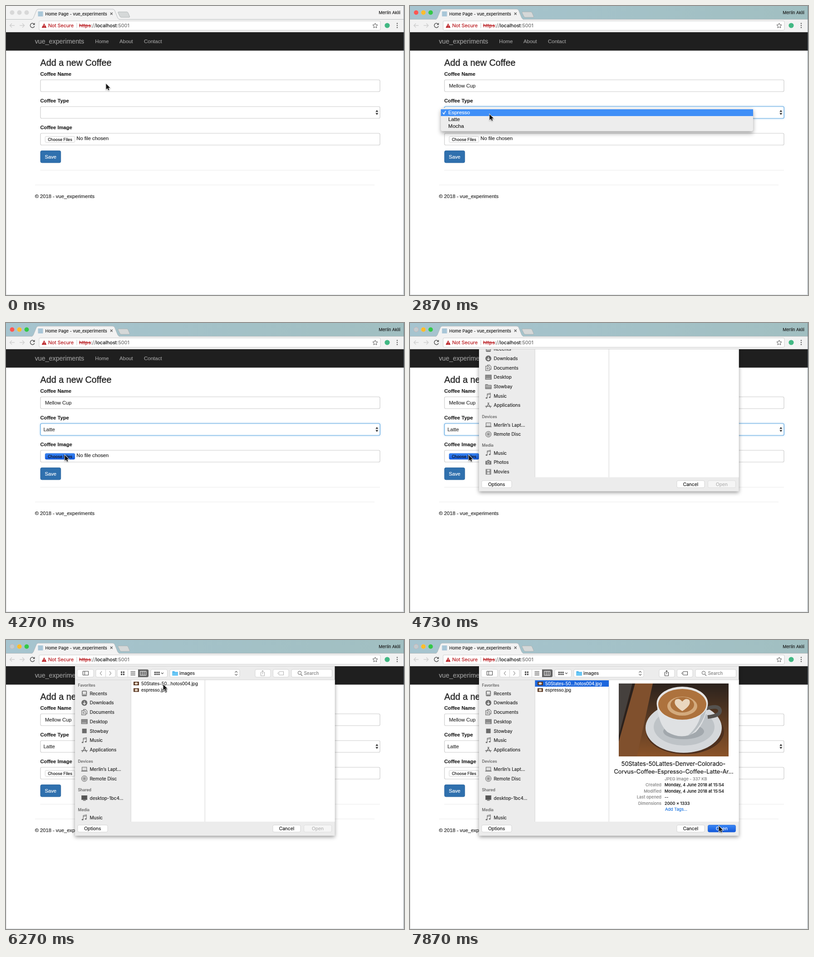
Write an HTML page that moves like this. It is 877 px wide and 638 px high and loops after 8 s.

```html
<!DOCTYPE html>
<html lang="en">
<head>
<meta charset="utf-8">
<title>Coffee form</title>
<style>
html, body { margin: 0; width: 100%; height: 100%; overflow: hidden; background: #fff; }
svg { display: block; }
#stage { width: 100vw; height: 100vh; font-family: "Liberation Sans", Arial, sans-serif; }
text, tspan { white-space: pre; fill: currentColor; stroke: currentColor; stroke-width: .2; }
.ui { font-family: Inter, Roboto, sans-serif; }
.line { fill: none; stroke-width: 1.1; }
.glow { filter: drop-shadow(0 0 2px rgba(102,175,233,.55)); }
.pop { filter: drop-shadow(0 5px 5px rgba(0,0,0,.35)); }
.shade { filter: drop-shadow(0 3px 4px rgba(0,0,0,.4)); }
.ptr { filter: drop-shadow(0 1px 1px rgba(0,0,0,.35)); }
</style>
</head>
<body>
<svg id="stage" viewBox="0 0 877 638" preserveAspectRatio="none"></svg>
<script>
const LOOP = 8000, FRAME = 200 / 3;

const rect = (x, y, w, h, fill, more = '') =>
  `<rect x="${x}" y="${y}" width="${w}" height="${h}" fill="${fill}" ${more}/>`;
const text = (x, y, size, str, color = '#262626', more = '') =>
  `<text x="${x}" y="${y}" font-size="${size}" color="${color}" ${more}>${str}</text>`;
const path = (d, fill, more = '') => `<path d="${d}" fill="${fill}" ${more}/>`;
const line = (d, stroke, more = '') => `<path class="line" d="${d}" stroke="${stroke}" ${more}/>`;
const circle = (x, y, r, fill, more = '') =>
  `<circle cx="${x}" cy="${y}" r="${r}" fill="${fill}" ${more}/>`;
const ellipse = (x, y, rx, ry, fill, more = '') =>
  `<ellipse cx="${x}" cy="${y}" rx="${rx}" ry="${ry}" fill="${fill}" ${more}/>`;
const group = (id, body, more = '') => `<g id="${id}" ${more}>${body}</g>`;
const at = (x, y, body) => `<g transform="translate(${x} ${y})">${body}</g>`;
const mid = 'text-anchor="middle"', end = 'text-anchor="end"', bold = 'font-weight="bold"', medium = 'font-weight="500"';

const gradient = (id, top, bottom) =>
  `<linearGradient id="${id}" x2="0" y2="1"><stop stop-color="${top}"/><stop offset="1" stop-color="${bottom}"/></linearGradient>`;

const defs = `<defs>
  ${gradient('blue', '#65aefa', '#1a70f5')}
  ${gradient('press', '#3a87f5', '#1257da')}
  ${gradient('wood', '#2b221d', '#8a5329')}
  <linearGradient id="strip"><stop stop-color="#a6c4cf"/><stop offset="1" stop-color="#a1bfc1"/></linearGradient>
  <clipPath id="page"><rect y="58" width="877" height="580"/></clipPath>
  <clipPath id="side"><rect x="152" y="58" width="123" height="343"/></clipPath>
</defs>`;

// Browser window
const lights = (id, colors) => group(id, colors.map((c, i) => circle(13.5 + 16 * i, 14.5, 5, c)).join(''));

function browser() {
  const dots = [38.5, 43, 47.5].map(y => circle(862, y, 1.2, '#5a5a5a')).join('');
  return rect(0, 0, 877, 30, '#f3f3f3') + rect(0, 0, 877, 30, 'url(#strip)', 'id="strip-on"') +
    lights('lights-off', ['#d8d8d8', '#d8d8d8', '#d8d8d8']) +
    lights('lights-on', ['#fc5753', '#fdbc2e', '#33c748']) +
    circle(13.5, 14.5, 5, '#c3cccf', 'id="close-off"') +
    rect(0, 29, 877, 29, '#f2f2f2') + line('M0 29.5H877', '#b9bdbe', 'stroke-width=".8"') +
    path('M56 30Q59 29 60.5 26L67 10Q68.5 7 71 7H235Q238 7 239.5 10L246 26Q247.5 29 251 30', '#f2f2f2', 'stroke="#aeb3b5" stroke-width=".8"') +
    path('M248 13H266Q268 13 269 15L272.5 23Q273 25 271 25H254Q252 25 251 23L247 15Q246.5 13 248 13Z', '#d5d8d8', 'stroke="#a5abac" stroke-width=".8"') +
    rect(70.5, 12, 11, 11, '#a9c6d8') +
    text(86.5, 20.6, 9.4, 'Home Page - vue_experiments', '#1c1c1c', 'class="ui"') +
    line('M229.8 14.5l5 5m0-5l-5 5', '#555') +
    text(869, 18.4, 9.2, 'Merlin Akili', '#1c1c1c', `class="ui" ${end}`) +
    line('M19 43H8.5m4.5-4.5L8.5 43l4.5 4.5M30 43H40.5m-4.5-4.5l4.5 4.5-4.5 4.5', '#cfcfcf', 'style="stroke-width:1.4"') +
    line('M62.3 40.3A4.8 4.8 0 1 0 62.8 44.5', '#555', 'style="stroke-width:1.5"') +
    path('M63.5 37v4.7h-4.7z', '#555') +
    rect(73, 33, 752, 20.5, '#fff', 'rx="2.5" stroke="#c9c9c9" stroke-width=".9"') +
    path('M84 38.2L89.3 48H78.7Z', '#b8171c') + rect(83.5, 41.5, 1.1, 3.4, '#fff') + rect(83.5, 45.7, 1.1, 1.1, '#fff') +
    text(93, 47, 10.6, 'Not Secure', '#b8171c', 'class="ui"') +
    line('M156 37V49', '#d0d0d0') +
    text(161, 47, 10.85, '<tspan color="#b8171c" text-decoration="line-through">https</tspan>://<tspan color="#111">localhost</tspan>:5001', '#707070', 'class="ui"') +
    path('M813.5 37.8l1.6 3.6 3.9.4-2.9 2.6.8 3.9-3.4-2-3.4 2 .8-3.9-2.9-2.6 3.9-.4z', 'none', 'stroke="#555"') +
    circle(840, 43, 5.6, '#41b883') + dots + rect(0, 57, 877, 1, '#cfcfcf');
}

// Page content
const field = y => rect(76, y, 748, 26, '#fff', 'rx="2.8" stroke="#ccc" stroke-width="1.2"');
const glow = (id, y) => rect(76, y, 748, 26, '#fff', `id="${id}" class="glow" rx="2.8" stroke="#66afe9" stroke-width="1.2"`);
const label = (y, str) => text(75.5, y, 11.2, str, '#222', bold);

function page() {
  return rect(0, 58, 877, 580, '#fff') + rect(0, 58, 877, 40.5, '#1f1f1f') +
    text(63.7, 83, 14.25, 'vue_experiments', '#9d9d9d') +
    text(196.3, 82, 11.3, 'Home', '#9d9d9d') + text(250, 82, 11.4, 'About', '#9d9d9d') + text(304, 82, 11.5, 'Contact', '#9d9d9d') +
    text(75.5, 131.5, 19.8, 'Add a new Coffee', '#262626', 'style="stroke-width:.4"') +
    label(154.3, 'Coffee Name') + field(163) + glow('name-focus', 163) +
    text(86, 180, 11.2, '', '#333', 'id="name"') +
    label(213.3, 'Coffee Type') + field(222) + glow('type-focus', 222) +
    text(82.5, 239, 11.4, 'Latte', '#333', 'id="type"') +
    path('M814.3 233.8L817.3 229.5L820.3 233.8ZM814.3 236.2L817.3 240.5L820.3 236.2Z', '#333') +
    label(272.3, 'Coffee Image') + field(281) +
    rect(86.3, 288, 65.4, 13, '#fff', 'id="choose" rx="2.5" stroke="#c6c6c6" stroke-width=".8"') +
    text(119, 297.7, 8.8, 'Choose Files', '#111', `class="ui" ${mid}`) +
    text(155.3, 296.3, 11.2, 'No file chosen') +
    rect(76, 319.5, 44.7, 26.5, '#2f70ae', 'rx="3" stroke="#2a649c" stroke-width=".9"') + text(98.3, 337, 11.2, 'Save', '#fff', mid) +
    rect(75.5, 362, 748.5, 1, '#eaeaea') + rect(64, 394.6, 748, 1, '#eaeaea') +
    text(63.7, 423.5, 11.2, '© 2018 - vue_experiments') +
    rect(0, 58, 1, 580, '#000', 'opacity=".14"') + rect(876, 0, 1, 638, '#62707c', 'opacity=".7"') + rect(0, 637, 877, 1, '#d5d9dc');
}

function menu() {
  const items = ['Espresso', 'Latte', 'Mocha'].map((s, i) => text(84.3, 239 + 15 * i, 11.5, s, '#222', `id="item${i}"`));
  return group('menu', rect(68, 225, 688, 51.3, '#ededed', 'class="pop" rx="4"') +
    rect(68, 228, 688, 15, '#3f8ff7', 'id="pick"') + items.join('') +
    line('M72.3 235.3l2.3 3.2 4-7', '#fff', 'id="tick" style="stroke-width:1.5"'));
}

// File sheet
const gray = '#6b6b6b';
const icons = {
  recents: rect(-5.5, -6, 11, 12, gray, 'rx="2"') + rect(-3.8, -4.5, 7.6, 6, '#e5e5e5') + line('M-5 3H5', '#e5e5e5'),
  down: circle(0, 0, 6.5, gray) + line('M0-3.5V3M-3 .5L0 3.5L3 .5', '#eee', 'style="stroke-width:1.5"'),
  docs: line('M-2-3.5V-6H2.5L6-2.5V3.5H3M-6-3.5H0L3-.5V6H-6ZM-4 0H0M-4 2.5H1', gray),
  desktop: rect(-6.5, -4.8, 13, 9.6, '#8b8b8b', `stroke="${gray}"`) + line('M-5 3H5', '#eee', 'stroke-dasharray="1.5 1"'),
  folder: path('M-6.5-4.5H-1.5L0-3H6.5V5H-6.5Z', '#999', `stroke="${gray}"`) + line('M-6-1H6', '#ddd'),
  box: rect(-5, -5, 10, 10, gray),
  music: line('M-2.5 4V-4.5L4.5-6V2.5M-2.5-2.3L4.5-3.8', gray) + ellipse(-4, 4.5, 2, 1.6, gray) + ellipse(3, 3, 2, 1.6, gray),
  apps: line('M-5 5.5L1.5-6M5 5.5L-1.5-6M-7 2H7', gray, 'style="stroke-width:1.4"'),
  laptop: rect(-5.2, -4.5, 10.4, 7.5, '#ddd', `stroke="${gray}"`) + rect(-7, 3.5, 14, 1.4, gray),
  disc: circle(0, 0, 6.3, '#d2d2d2', `stroke="${gray}"`) + circle(0, 0, 3.2, 'none', 'stroke="#888"') + circle(0, 0, 1.5, gray),
  screen: rect(-6, -5.5, 12, 9, '#555', `stroke="${gray}"`) + rect(-3, 4.5, 6, 1.5, gray),
  camera: path('M-6.5-3H-3L-2-5H2L3-3H6.5V5H-6.5Z', '#777') + circle(0, .8, 2.7, '#777', 'stroke="#eee"'),
  film: rect(-6, -6, 12, 12, gray) + rect(-3, -5, 6, 4.4, '#ddd') + rect(-3, .6, 6, 4.4, '#ddd') + line('M-4.7-5V6M4.7-5V6', '#ddd', 'stroke-dasharray="1.5 1.2"'),
};
const icon = (y, name) => at(172.7, y, icons[name]);
const entry = (y, name, str) => icon(y, name) + text(184.5, y + 3.7, 10.1, str);
const heading = (y, str) => text(158.5, y + 3.2, 8.7, str, '#6c6c6c', medium);
const button = (x, y, w, h, more = '') => rect(x, y, w, h, '#fff', `rx="3" stroke="#cdcdcd" stroke-width=".8" ${more}`);

function sidebar() {
  const rows = [['recents', 'Recents'], ['down', 'Downloads'], ['docs', 'Documents'], ['desktop', 'Desktop'],
    ['box', 'Stowbay'], ['music', 'Music'], ['apps', 'Applications']];
  const favorites = rows.map(([name, s], i) => {
    const y = 118 + 20.7 * i;
    if (name !== 'box') return entry(y, name, s);
    return group('box-old', icon(y, 'folder')) + group('box-new', icon(y, 'box')) + text(184.5, y + 3.7, 10.1, s);
  });
  return `<g clip-path="url(#side)">` + heading(100, 'Favorites') + favorites.join('') +
    heading(267.5, 'Devices') + entry(285.3, 'laptop', 'Merlin’s Lapt...') + entry(306, 'disc', 'Remote Disc') +
    group('shared', heading(331, 'Shared') + entry(349, 'screen', 'desktop-1bc4...')) +
    group('media', heading(330, 'Media') + entry(347.5, 'music', 'Music') + entry(368, 'camera', 'Photos') + entry(389, 'film', 'Movies')) + '</g>';
}

function squares(x, y, cols, step, size) {
  let out = '';
  for (let i = 0; i < cols * 2; i++) out += rect(x + i % cols * step, y + (i / cols | 0) * step, size, size, '#444');
  return out;
}

function toolbar() {
  return button(157, 65, 36, 17) + line('M169.5 69H181.5V77.5H169.5ZM173.5 69V77.5', '#444') +
    button(198, 65, 43, 17) + line('M219.5 65V82', '#d5d5d5') + line('M211 69l-3.5 4.5 3.5 4.5M228 69l3.5 4.5-3.5 4.5', '#888') +
    button(245, 65, 69, 17) + line('M268.5 65V82', '#d5d5d5') + squares(253, 69.5, 2, 4.8, 3.2) +
    line('M274.5 69.5H285M274.5 72.2H285M274.5 75H285M274.5 77.7H285', '#444') +
    path('M291 65H311Q314 65 314 68V79Q314 82 311 82H291Z', '#646464') + line('M296 69H308.5V78H296ZM300.2 69V78M304.3 69V78', '#fff') +
    button(319, 65, 36.5, 17) + squares(327, 70, 3, 4.3, 3) + line('M342 72l2.5 2.7 2.5-2.7', '#444') +
    button(361, 65, 154, 17) + path('M366.5 69H371L372.5 70.5H379V78.5H366.5Z', '#49b4ee') + rect(366.5, 71.8, 12.5, 6.7, '#69c7f5') +
    text(382, 77, 10, 'images') + line('M504.5 72l2.7-3 2.7 3M504.5 75l2.7 3 2.7-3', '#444') +
    button(549, 65, 34, 17) + button(588.5, 65, 34.5, 17) +
    group('tools', line('M563.5 71.5H561.5V79H569.5V71.5H567.5M565.5 75.5V67.5M563.3 69.7l2.2-2.2 2.2 2.2M602.5 69.7H611.5V77.3H602.5L599 73.5Z', 'currentColor') + circle(602.5, 73.5, .8, 'currentColor')) +
    button(629, 65, 89.5, 17) + line('M650 76l3 3', '#555') + circle(647, 72.5, 3.7, 'none', 'stroke="#555"') + text(656.5, 77, 9.9, 'Search', '#858585');
}

const photo = () => `<svg x="460" y="96" width="242" height="161" viewBox="0 0 242 161">` +
  rect(0, 0, 242, 161, 'url(#wood)') +
  path('M30 0H75L40 161H0V110Z', '#80502d') + path('M0 0H30L0 115Z', '#45403d') + path('M30 0L0 115V128L36 0Z', '#2a211d') +
  ellipse(146, 106, 86, 50, '#4e301e') +
  ellipse(143, 98, 84, 55, '#d5d8db') + ellipse(144, 96, 67, 41, '#bec3c7') + ellipse(143, 106, 45, 17, '#a2a8ad') +
  path('M190 56Q220 46 223 59Q225 71 196 74', 'none', 'stroke="#55524f" stroke-width="8"') +
  path('M84 45Q87 89 107 107Q139 126 170 107Q192 83 196 45Z', '#dfe1e3') + path('M160 112Q188 89 196 45L183 60Q178 94 151 116Z', '#b9bfc3') +
  ellipse(140, 44, 56.5, 37, '#e6e5e4') + ellipse(140, 46, 53, 34, '#ad723d') +
  ellipse(140, 50, 33, 21, '#d3aa7d') + ellipse(140, 47, 26, 17, '#ad723d') +
  path('M140 61Q118 47 125 36Q133 31 140 40Q147 31 155 36Q162 47 140 61Z', '#ead7bf') + '</svg>';

function preview() {
  const facts = [['Created', 'Monday, 4 June 2018 at 15:54'], ['Modified', 'Monday, 4 June 2018 at 15:54'], ['Last opened', '--'], ['Dimensions', '2000 × 1333']];
  return group('preview', photo() +
    text(580.5, 278, 12.9, '50States-50Lattes-Denver-Colorado-', '#151515', mid) +
    text(581, 295, 12.8, 'Corvus-Coffee-Espresso-Coffee-Latte-Ar...', '#151515', mid) +
    text(561, 309.5, 9.2, 'JPEG image - 337 KB', '#8e8e8e', medium) +
    facts.map(([k, v], i) => text(554, 323 + 13.5 * i, 9.2, k, '#8e8e8e', `${medium} ${end}`) +
      text(561, 323 + 13.5 * i, 9.2, v, '#1c1c1c', medium)).join('') +
    text(562, 377, 9.2, 'Add Tags...', '#1b74e0'));
}

function files() {
  const thumb = y => rect(281, y, 12, 8, '#5b3925') + ellipse(287, y + 4, 3.5, 2.5, '#e5d3bf');
  return group('files', rect(275.5, 89, 162.5, 14, '#1c66dd', 'id="row"') + thumb(92) + thumb(106.5) +
    text(298, 99.7, 9.65, '50States-50...hotos004.jpg', '#222', 'id="file"') + text(298, 114.2, 9.4, 'espresso.jpg', '#222'));
}

function sheet() {
  const body = rect(152, 58, 572.5, 374, '#ececec', 'class="shade"') + rect(275, 88, 449.5, 313, '#fff') +
    line('M152 88H724.5M275.3 88V401M438.3 88V401', '#d6d6d6', 'stroke-width=".8"') +
    toolbar() + sidebar() + files() + preview() +
    button(158, 408.5, 66, 15.5) + text(190.8, 420, 10.2, 'Options', '#1c1c1c', mid) +
    button(588, 408.5, 61, 15.5) + text(618.4, 420, 10.2, 'Cancel', '#1c1c1c', mid) +
    button(656.5, 408.5, 61, 15.5, 'id="open"') + text(687, 420, 10.2, 'Open', '#b4b4b4', `id="open-text" ${mid}`);
  return `<g clip-path="url(#page)">${group('sheet', body, 'class="ui"')}</g>`;
}

const pointers = group('arrow', path('M0 0V12.8L3 10L5 14.5L7 13.6L5 9.3H9Z', '#111', 'class="ptr" stroke="#fff" stroke-width="1.6" paint-order="stroke"')) +
  group('beam', line('M-2.8-6.5Q0-6.5 0-4.5Q0-6.5 2.8-6.5M0-4.5V5M-2.8 7Q0 7 0 5Q0 7 2.8 7M-1.5 2.5H1.5', '#333'));

document.getElementById('stage').innerHTML = defs + browser() + page() + menu() + sheet() + pointers;

// Animation
const $ = id => document.getElementById(id);
const show = (id, on) => { $(id).style.display = on ? '' : 'none'; };
const set = (id, name, value) => $(id).setAttribute(name, value);
const ramp = (t, a, b) => Math.max(0, Math.min(1, (t - a) / (b - a)));
const smooth = u => u * u * (3 - 2 * u);

// Pointer stops: time, x, y
const stops = [[0, 220.5, 171.5], [600, 220.5, 173.5], [930, 200.5, 172.5], [1670, 200.5, 172.5],
  [2200, 172, 257], [2470, 175, 241], [2800, 175, 241], [2870, 175.3, 239], [3070, 176, 243.5], [3400, 176, 243.5],
  [4070, 129.5, 291.5], [4930, 129.5, 291.5], [6130, 351, 106], [6270, 346.5, 98], [6800, 346.5, 98], [7470, 680.5, 410.5]];

function pointer(t) {
  let i = 0;
  while (i < stops.length - 2 && t >= stops[i + 1][0]) i++;
  const [t0, x0, y0] = stops[i], [t1, x1, y1] = stops[i + 1];
  const u = smooth(ramp(t, t0, t1));
  return [x0 + (x1 - x0) * u, y0 + (y1 - y0) * u];
}

function draw(time) {
  const t = Math.round(Math.floor((time + 4) / FRAME) * FRAME / 10) * 10;

  const active = t >= 200, sheetOn = t >= 4470;
  show('strip-on', active);
  show('lights-on', active);
  show('close-off', sheetOn);

  $('name').textContent = 'Mellow Cup'.slice(0, t < 1130 ? 0 : t < 1200 ? 6 : 10);
  set('name-focus', 'opacity', ramp(t, 540, 730) - ramp(t, 2330, 2470));
  set('type-focus', 'opacity', ramp(t, 2330, 2470) - ramp(t, 5000, 5130));
  show('type', t >= 3530);
  const held = t >= 4270 && t < 5070;
  set('choose', 'fill', held ? 'url(#press)' : '#fff');
  set('choose', 'stroke', held ? '#1b62d8' : '#c6c6c6');

  show('menu', t >= 2530 && t < 3670);
  set('menu', 'opacity', 1 - ramp(t, 3470, 3670));
  const picked = t >= 3000 ? 1 : 0;
  show('pick', t < 3330 || t >= 3400);
  set('pick', 'y', 228 + 15 * picked);
  for (let i = 0; i < 3; i++) set('item' + i, 'color', i === picked ? '#fff' : '#222');
  set('tick', 'stroke', picked ? '#222' : '#fff');

  show('sheet', sheetOn);
  const slide = (1 - Math.cos(Math.PI * ramp(t, 4470, 4823))) / 2;
  set('sheet', 'transform', `translate(0 ${374 * (slide - 1)})`);
  const loaded = t >= 5530, chosen = t >= 6470;
  show('files', t >= 5330);
  show('shared', loaded);
  show('box-old', !loaded);
  show('box-new', loaded);
  set('media', 'transform', `translate(0 ${loaded ? 44.5 : 0})`);
  show('row', chosen);
  set('file', 'color', chosen ? '#fff' : '#222');
  set('tools', 'color', chosen ? '#444' : '#b0b0b0');
  show('preview', t >= 6530);
  set('open', 'fill', t >= 7870 ? 'url(#press)' : chosen ? 'url(#blue)' : '#f5f5f5');
  set('open', 'stroke', chosen ? '#2468d8' : '#d8d8d8');
  set('open-text', 'color', chosen ? '#fff' : '#b4b4b4');

  const [x, y] = pointer(t);
  const typing = active && t < 2470 && y < 189;
  show('beam', typing);
  show('arrow', !typing);
  set(typing ? 'beam' : 'arrow', 'transform', `translate(${x} ${y})`);
}

const start = performance.now();
(function tick() {
  draw((performance.now() - start) % LOOP);
  requestAnimationFrame(tick);
})();
</script>
</body>
</html>
```
